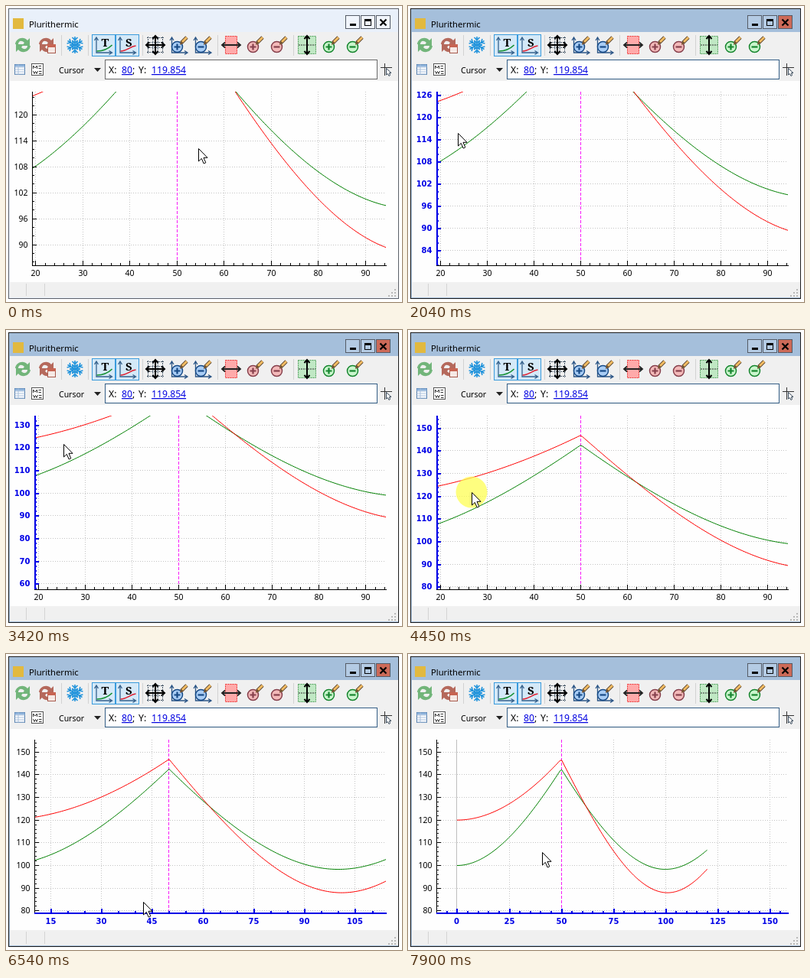
An HTML page that plays this animation: 517 px wide and 387 px high, repeating every 8 s.

```html
<!DOCTYPE html>
<html lang="en">
<head>
<meta charset="utf-8">
<title>Plurithermic</title>
<style>
  html, body { margin: 0; width: 100%; height: 100%; overflow: hidden; background: #fff; }
  svg { display: block; width: 517px; height: 387px; }
  text { font: 10.5px "Noto Sans", "Open Sans", sans-serif; fill: #000; white-space: pre; }
  .bold { font: bold 10px "DejaVu Sans", sans-serif; fill: #0000e6; }
  .title { font-size: 11.2px; }
  .value { font-size: 12.2px; }
  .link { fill: #0000e0; text-decoration: underline; }
  .crisp { shape-rendering: crispEdges; }
</style>
</head>
<body>
<svg viewBox="0 0 517 387">
  <g id="chrome"></g>
  <g id="tools"></g>
  <g id="plot"></g>
  <circle id="press" r="20.5" fill="#ffff50" fill-opacity=".72"/>
  <path id="pointer" d="M.5 .5V17L4.3 13.4L7.2 20L9.8 18.8L7 12.3H12Z" fill="#fff" stroke="#000"/>
</svg>
<script>
const $ = id => document.getElementById(id);

// ---- markup helpers ----
const rect = (x, y, w, h, fill, stroke = 'none') =>
  `<rect x="${x}" y="${y}" width="${w}" height="${h}" fill="${fill}" stroke="${stroke}"/>`;
const path = (d, stroke, width = 1, more = '') =>
  `<path d="${d}" fill="none" stroke="${stroke}" stroke-width="${width}" ${more}/>`;
const shape = (d, fill, stroke = 'none') => `<path d="${d}" fill="${fill}" stroke="${stroke}"/>`;
const dot = (x, y, r, fill, stroke, width) =>
  `<circle cx="${x}" cy="${y}" r="${r}" fill="${fill}" stroke="${stroke}" stroke-width="${width}"/>`;
const label = (x, y, s, cls = '', anchor = 'start') =>
  `<text x="${x}" y="${y}" class="${cls}" text-anchor="${anchor}">${s}</text>`;
const at = (x, y, s) => `<g transform="translate(${x} ${y})">${s}</g>`;

// ---- window frame, bars and status line ----
function chrome(active) {
  const bar = active ? '#a5bfdb' : '#e9f0fa';
  const edge = active ? '#1c1c1c' : '#5c6068';
  const face = active ? '#b4cbe4' : '#f1f5fc';
  const button = (x, fill) => rect(x, 12.5, 18, 17, fill, '#555b66');
  return `<g class="crisp">` +
    rect(3.5, 3.5, 509, 379, bar, edge) +
    rect(5, 34, 507, 64, '#f0f0f0') +
    rect(5, 98, 507, 263, '#fefefe') +
    rect(5, 361, 507, 20, '#f0f0f0') +
    path('M26.5 363V379M50.5 363V379', '#d4d4d4') +
    button(443.5, face) + button(463.5, face) +
    button(483.5, active ? '#cd6a58' : face) +
    rect(449, 23, 8, 3, '#000') +
    rect(468.5, 17.5, 8, 8, 'none', '#000') + rect(468, 17, 9, 3, '#000') +
    rect(129.5, 70.5, 355, 25, '#fff', active ? '#345e86' : '#6a6a6a') + `</g>` +
    path('M488.5 17.5l8 8m0 -8l-8 8', '#000', 2.2) +
    rect(9, 16, 14, 14, '#e2b93f') +
    label(30, 28, 'Plurithermic', 'title') +
    [[508, 371], [508, 375], [504, 375], [508, 379], [504, 379], [500, 379]]
      .map(([x, y]) => rect(x - 1, y - 1, 2, 2, '#b8b8b8')).join('');
}

// ---- toolbar icons, each drawn around its own centre ----
function refresh(c) {
  const half = shape('M-10 -1C-9 -9 1 -12 6 -6L9 -9V1H-1L2 -3C-2 -7 -6 -5 -6 -1Z', c);
  return half + `<g transform="rotate(180)">${half}</g>`;
}
function snowflake() {
  const arm = path('M0 0V-11M-3.5 -10L0 -6.5L3.5 -10M-3.5 -6L0 -2.5L3.5 -6', '#2294dc', 1.6);
  return [0, 60, 120, 180, 240, 300].map(a => `<g transform="rotate(${a})">${arm}</g>`).join('');
}
const corner = 'M-9.5 -9V10H11M-12 -6L-9.5 -10L-7 -6M7 7.5L11 10L7 12.5';

function axisButton(letter, curve, color) {
  return `<g class="crisp">${rect(-15, -13.5, 30, 28, '#d4e9f8', '#3a9bdc')}</g>` +
    path(corner, '#36628c', 1.3) + path(curve, color, 1.6) +
    `<text x="2" y="2" text-anchor="middle" style="font:bold 15px 'Noto Serif','Liberation Serif',serif">${letter}</text>`;
}
function zoom({ fill, ink, axes }, plus) {
  return (axes ? path(corner, '#2b5586', 1.3) : '') +
    dot(-2.5, 2.5, 7, fill, ink, 1.5) +
    path('M-6.5 2.5H1.5' + (plus ? 'M-2.5 -1.5V6.5' : ''), ink, 2.2) +
    path('M3 -3L10 -10', '#5a4630', 4.6) + path('M4 -4L10 -10', '#f2bb62', 3) +
    shape('M1 0L2 -5L5 -2Z', '#775530');
}
const ZOOMS = [
  { x: 226, fill: '#a9cdf5', ink: '#174a86', axes: true },
  { x: 325, fill: '#f3b9b9', ink: '#86404c' },
  { x: 424, fill: '#c9f5cc', ink: '#16852e' }
];
const arrowsH = 'M-12 0H12M-8 -3.5L-12 0L-8 3.5M8 -3.5L12 0L8 3.5';
const arrowsV = 'M0 -12V12M-3.5 -8L0 -12L3.5 -8M-3.5 8L0 12L3.5 8';
const dashBox = (x, y, w, h, fill, stroke) =>
  rect(x, y, w, h, fill, stroke).replace('/>', ' stroke-dasharray="2 1"/>');

function tools() {
  const separators = [72, 107, 178, 276, 375].map(x => `M${x}.5 38V65`).join('');
  const zooms = ZOOMS.map(z => at(z.x, 51, zoom(z, true)) + at(z.x + 31, 51, zoom(z, false))).join('');
  let rows = '', mesh = '';
  for (let y = 3; y < 13; y += 3) rows += `M0 ${y + .5}H13`;
  for (let p = -9.5; p < 10; p += 6.33) mesh += `M${p} -11V11M-11 ${p}H11`;
  return path(separators, '#d2d2d2', 1, 'class="crisp"') +
    at(22, 51, refresh('#72b57a')) +
    at(53, 51, refresh('#b5695c')) + rect(54.5, 50.5, 10, 11, '#f6e9e5', '#a85a4c') +
    rect(54, 50, 11, 4, '#c76452') +
    at(90, 51, snowflake()) +
    at(127.5, 51, axisButton('T', 'M-9 8C-2 8 5 6 11 0', '#149030')) +
    at(158.5, 51, axisButton('S', 'M-9 8C0 8 3 2 11 1', '#e02030')) +
    at(195, 51, path(mesh, '#456', 1, 'stroke-dasharray="2 1"') + path(arrowsH + arrowsV, '#000', 2)) +
    at(294, 51, dashBox(-7.5, -11.5, 15, 23, '#ffaaaa', '#e33') + path(arrowsH, '#222', 1.8)) +
    at(393, 51, dashBox(-11.5, -11.5, 23, 23, '#c0e8c4', '#51a05c') + path(arrowsV, '#000', 2) +
      path('M-11 0H11', '#333', 1, 'stroke-dasharray="2 1"')) +
    zooms +
    at(11.5, 76.5, rect(0, 0, 13, 13, '#fff', '#4f79a8') + rect(0, 0, 13, 3, '#8eb3dc') +
      path(rows + 'M4.5 0V13', '#a9c0dc')) +
    rect(33.5, 75.5, 15, 15, '#fff', '#555') +
    path('M35.5 82V78L38 81L40.5 78V82M42.5 78.5H46M42.5 81.5H46M35.5 85L37 88.5L38.5 85.5L40 88.5L41.5 85M43 85.5H46.5M43 88.5H46.5', '#333') +
    label(69, 87.5, 'Cursor') + shape('M115 81H124L119.5 86Z', '#222') +
    label(134, 88, 'X:', 'value') + label(151, 88, '80', 'value link') +
    label(165, 88, ';', 'value') + label(173, 88, 'Y:', 'value') +
    label(190, 88, '119.854', 'value link') +
    path('M489 80.5H504M494.5 75V91', '#333', 1, 'class="crisp"') +
    shape('M496.5 81.5V90L498.5 88.5L500 91.5L501.5 90.5L500.5 87.5H503Z', '#fff', '#345');
}

// ---- the two curves ----
const lift = (u, k) => u * u * (1 + k * (1 - u));
const curve = (start, peak, low, dip, k1, k2) => x => x < 50
  ? start + (peak - start) * lift(x / 50, k1)
  : low + (peak - low) * lift(Math.abs(dip - x) / (dip - 50), k2);
const red = curve(120, 146.8, 88, 101, .13, .43);
const green = curve(100, 142.5, 98.3, 100, .33, .34);

// ---- plot ----
const TOP = 112, BOTTOM = 339, RIGHT = 496, WHEEL = 1.1755;
const MINOR = { 6: 2, 8: 2, 10: 2, 15: 5, 20: 5, 25: 5 };
const stepFor = range => Object.keys(MINOR).map(Number).find(s => s >= range / 8);

function ticks(lo, hi, each) {
  const major = stepFor(hi - lo), minor = MINOR[major];
  for (let i = Math.ceil(lo / minor); i * minor <= hi; i++) {
    each(i * minor, (i * minor) % major === 0);
  }
}

function plot({ axis, wide, yZoom, yShift, xZoom }) {
  const left = wide ? 37 : 34;
  const sx = (wide ? 6.107 : 6.152) / WHEEL ** xZoom;
  const sy = 5.667 / WHEEL ** yZoom;
  const X = v => wide ? 179 + (v - 42.45) * sx : 34 + (v - 19.3) * sx;
  const Y = v => 166 + yShift - (v - 115.7) * sy;
  const xLo = wide ? 42.45 - 141.5 / sx : 19.3;
  const xHi = xLo + (RIGHT - left) / sx;
  const yHi = 115.7 + (166 + yShift - TOP) / sy;
  const yLo = yHi - 227.5 / sy;
  const mid = p => Math.round(p) + .5;
  let grid = '', xTicks = '', yTicks = '', labels = '';

  ticks(xLo, xHi, (v, major) => {
    const x = mid(X(v));
    xTicks += `M${x} ${BOTTOM}v${major ? -6 : -3}`;
    if (!major) return;
    grid += `M${x} ${TOP}V${BOTTOM}`;
    labels += label(x, 353, v, axis === 'x' ? 'bold' : '', 'middle');
  });
  ticks(yLo, yHi, (v, major) => {
    const y = mid(Y(v));
    yTicks += `M${left} ${y}h${major ? 6 : 3}`;
    if (!major) return;
    grid += `M${left} ${y}H${RIGHT}`;
    labels += label(left - 5.5, y + 3.5, v, axis === 'y' ? 'bold' : '', 'end');
  });

  const trace = (f, color) => {
    let d = '';
    const from = Math.max(0, xLo), to = Math.min(120, xHi), n = 160;
    for (let i = 0; i <= n; i++) {
      const x = from + (to - from) * i / n;
      d += `${i ? 'L' : 'M'}${(X(x) + .5).toFixed(2)} ${(Y(f(x)) + .5).toFixed(2)}`;
    }
    return path(d, color, 1, 'clip-path="url(#area)"');
  };
  const scale = (line, marks, on) => on
    ? path(line, '#0000e6', 2) + path(marks, '#0000e6', 2)
    : path(line + marks, '#000');
  const zero = xLo < 0 ? path(`M${mid(X(0))} ${TOP}V${BOTTOM}`, '#bebebe') : '';

  return `<clipPath id="area"><rect x="${left}" y="${TOP}" width="${RIGHT - left}" height="${BOTTOM - TOP}"/></clipPath>` +
    `<g class="crisp">` + path(grid, '#c4c4c4', 1, 'stroke-dasharray="1 2"') + zero +
    path(`M${mid(X(50))} ${TOP}V${BOTTOM}`, '#f81cf8', 1, 'stroke-dasharray="4 2"') + `</g>` +
    trace(green, '#008000') + trace(red, '#ff0000') + `<g class="crisp">` +
    scale(`M${left + .5} ${TOP}V${BOTTOM + 1}`, yTicks, axis === 'y') +
    scale(`M${left} ${BOTTOM + (axis === 'x' ? 0 : .5)}H${RIGHT + 1}`, xTicks, axis === 'x') +
    `</g>` + labels;
}

// ---- timeline: [ms, pointer x, pointer y, changes]; changes carry forward ----
const STEPS = [
  [0, 251, 186, { active: false, axis: '', wide: false, yZoom: 0, yShift: 0, xZoom: 0, press: false }],
  [330, 125, 179],
  [680, 50, 167],
  [1030, 34, 165, { press: true }],
  [1360, 34, 165, { press: false, active: true, axis: 'y' }],
  [1710, 65, 166],
  [2040, 65, 166, { wide: true, yZoom: 1 }],
  [2390, 67, 166, { yZoom: 2 }],
  [2740, 69, 166, { yZoom: 3 }],
  [3070, 69, 166, { yZoom: 4 }],
  [3420, 75, 149],
  [3770, 76, 157, { press: true, yShift: 8 }],
  [4100, 79, 182, { yShift: 33 }],
  [4450, 83, 212, { yShift: 63.4 }],
  [4800, 158, 318, { press: false }],
  [5130, 175, 344, { press: true }],
  [5510, 177, 338, { press: false, axis: 'x' }],
  [5840, 179, 324],
  [6190, 179, 324, { xZoom: 1 }],
  [6540, 179, 324, { xZoom: 2 }],
  [6870, 179, 324, { xZoom: 3 }],
  [7220, 179, 324, { xZoom: 4 }],
  [7550, 179, 324, { xZoom: 5 }],
  [7900, 175, 259]
];
let carried = {};
const states = STEPS.map(([ms, x, y, change]) => {
  carried = { ...carried, ...change };
  return { ...carried, ms, x, y };
});

let shown = null;
function show(state) {
  if (state === shown) return;
  if (!shown || shown.active !== state.active) $('chrome').innerHTML = chrome(state.active);
  $('plot').innerHTML = plot(state);
  $('pointer').setAttribute('transform', `translate(${state.x} ${state.y})`);
  $('press').setAttribute('transform', `translate(${state.x} ${state.y})`);
  $('press').setAttribute('visibility', state.press ? 'visible' : 'hidden');
  shown = state;
}

$('tools').innerHTML = tools();
const begin = performance.now();
function tick() {
  const t = (performance.now() - begin) % 8000;
  show(states.findLast(s => s.ms <= t));
  requestAnimationFrame(tick);
}
tick();
</script>
</body>
</html>
```
